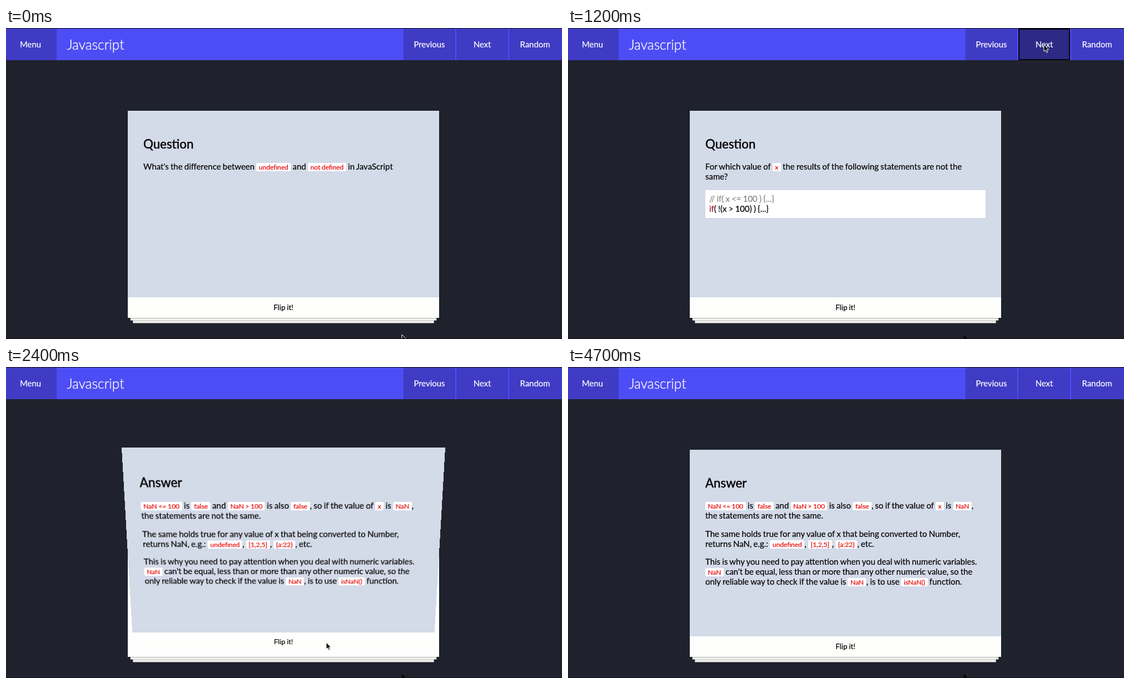
Recreate the animation shown at these times as an HTML page. Size 1000 by 560 pixels, loop 5200 ms.

```html
<!DOCTYPE html>
<html lang="en">
<head>
<meta charset="utf-8">
<title>Flashcards</title>
<style>
  html, body { margin: 0; width: 100%; height: 100%; overflow: hidden; background: #1f222c; }
  body { font: 14.93px/1.2 Lato, "Open Sans", sans-serif; word-spacing: -.55px; color: #000; -webkit-text-stroke: .2px; }
  #stage { position: relative; width: 1000px; height: 560px; overflow: hidden; background: #1f222c; }
  #stage::before, #stage::after { content: ""; position: absolute; left: 0; width: 100%; height: 1px; background: #101218; }
  #stage::before { top: 0; }
  #stage::after { bottom: 0; }

  header { position: absolute; top: 1px; left: 0; width: 1000px; height: 57px; background: #4d4df5; color: #fff; }
  header h1 { position: absolute; left: 109.5px; top: 14px; margin: 0; font-size: 24.5px; font-weight: 300; -webkit-text-stroke: .35px; }
  .btn { position: absolute; top: 0; height: 57px; box-sizing: border-box; line-height: 57px; text-align: center; background: #3f3bc4; }
  .btn.hover { background: #2d2a85; }
  .btn.focus { box-shadow: inset 0 0 0 2px #050510; }
  #menu { left: 0; width: 91px; padding-right: 3px; }
  #prev { left: 715px; width: 93px; }
  #next { left: 810px; width: 93px; }
  #rand { left: 905px; width: 95px; padding-right: 2px; }

  .base, .card { position: absolute; left: 219px; top: 149px; width: 560px; height: 373px; }
  .base {
    background: #fff;
    box-shadow: 0 1px 1px rgba(0,0,0,.25),
      0 9.3px 0 -4.7px #f3f3f0, 0 9.3px 1px -3.9px rgba(0,0,0,.25),
      0 18.7px 0 -9.3px #f3f3f0;
  }
  .card { background: #d3dae8; white-space: nowrap; }
  .card article { padding: 28px; }
  h2 { margin: 18.6px 0; font-size: 22.3px; line-height: 26.9px; font-weight: 400; -webkit-text-stroke: .45px; }
  p { margin: 0 0 14.8px; }
  code { font: 12px/1.2 Lato, "Open Sans", sans-serif; padding: 0 4.5px; border-radius: 2px; background: #fff; color: #e60000; }
  pre { margin: 0; padding: 7px; font: inherit; background: #fff; }
  pre i { font-style: normal; color: #858585; }
  pre b { font-weight: 400; color: #a01020; }
  footer { position: absolute; left: 0; bottom: 0; width: 100%; height: 37px; line-height: 37px; font-size: 13.3px; text-align: center; background: #fefefc; }
  footer.focus { outline: 3px solid rgba(50,85,245,.65); }
  svg { position: absolute; left: 0; top: 0; }
</style>
</head>
<body>
<div id="stage">
  <header>
    <div class="btn" id="menu">Menu</div>
    <h1>Javascript</h1>
    <div class="btn" id="prev">Previous</div>
    <div class="btn" id="next">Next</div>
    <div class="btn" id="rand">Random</div>
  </header>

  <div class="base"></div>

  <section class="card" id="front">
    <article id="first">
      <h2>Question</h2>
      <p>What's the difference between <code>undefined</code> and <code>not defined</code> in JavaScript</p>
    </article>
    <article id="second">
      <h2>Question</h2>
      <p>For which value of <code>x</code> the results of the following statements are not the<br>same?</p>
      <pre><i>// if( x &lt;= 100 ) {...}</i>
<b>if</b>( !(x &gt; 100) ) {...}</pre>
    </article>
    <footer id="flip">Flip it!</footer>
  </section>

  <section class="card" id="back">
    <article>
      <h2>Answer</h2>
      <p><code>NaN &lt;= 100</code> is <code>false</code> and <code>NaN &gt; 100</code> is also <code>false</code>, so if the value of <code>x</code> is <code>NaN</code>,<br>the statements are not the same.</p>
      <p>The same holds true for any value of x that being converted to Number,<br>returns NaN, e.g.: <code>undefined</code>, <code>[1,2,5]</code>, <code>{a:22}</code>, etc.</p>
      <p>This is why you need to pay attention when you deal with numeric variables.<br><code>NaN</code> can't be equal, less than or more than any other numeric value, so the<br>only reliable way to check if the value is <code>NaN</code>, is to use <code>isNaN()</code> function.</p>
    </article>
    <footer>Flip it!</footer>
  </section>

  <svg width="1000" height="560">
    <path id="speck" d="M712 553l7 7h-7z" fill="#000"/>
    <path id="cursor" d="M0 0V12.2L2.8 9.6L4.8 14.2L6.8 13.3L4.9 8.9H8.6Z" fill="#000" stroke="#fff"/>
  </svg>
</div>

<script>
const LOOP = 5200, STEP = 100, SCALE = 14 / 15;
const $ = id => document.getElementById(id);
const clamp = k => Math.min(1, Math.max(0, k));
const smooth = k => k * k * (3 - 2 * k);
const easeOut = k => 1 - (1 - k) ** 1.85;
const mix = (a, b, k) => a + (b - a) * k;
const show = (id, on) => { $(id).style.display = on ? "" : "none"; };

// Pointer stops: time, x, y
const path = [
  [0, 712, 552], [600, 925, 40], [800, 856, 30], [1500, 856, 30], [1800, 576, 496],
  [3000, 576, 496], [3200, 742, 32], [3300, 742, 32], [3400, 671, 53], [3600, 655, 425]
];

function pointer(t) {
  const i = path.findIndex(p => p[0] > t);
  if (i < 0) return path[path.length - 1].slice(1);
  const [t0, x0, y0] = path[i - 1], [t1, x1, y1] = path[i];
  const k = smooth((t - t0) / (t1 - t0));
  return [mix(x0, x1, k), mix(y0, y1, k)];
}

// The card backs up a little, then shoots out to the right
function slide(t) {
  const k = (t - 900) / 500, front = $("front").style;
  front.transform = "none";
  front.opacity = 1;
  if (k <= 0 || t >= 1200) return;
  const out = easeOut(clamp((k - .2) / .8));
  const x = k <= .2 ? -20 * easeOut(k / .2) : mix(-20, 2000, out);
  front.transform = `translateX(${x * SCALE}px)`;
  front.opacity = 1 - out;
}

function flip(t) {
  const angle = 180 * smooth(clamp((t - 2060) / 400));
  const isFront = angle < 90;
  show("front", isFront);
  show("back", !isFront);
  const tilt = isFront ? angle : angle - 180;
  if (angle) $(isFront ? "front" : "back").style.transform =
    tilt ? `perspective(933px) rotateX(${tilt}deg)` : "none";
}

function draw(t) {
  const mark = (id, name, from, to) => $(id).classList.toggle(name, t >= from && t < to);
  mark("rand", "hover", 600, 700);
  mark("next", "hover", 700, 1600);
  mark("next", "focus", 900, 2000);
  mark("prev", "hover", 3200, 3500);
  mark("flip", "focus", 2000, LOOP);

  show("first", t < 1200);
  show("second", t >= 1200);
  slide(t);
  flip(t);

  show("speck", t >= STEP);
  show("cursor", t < 3700);
  $("cursor").setAttribute("transform", `translate(${pointer(t)})`);
}

const start = performance.now();
function tick() {
  const t = (performance.now() - start) % LOOP;
  draw(Math.floor(t / STEP) * STEP);
  requestAnimationFrame(tick);
}
tick();
</script>
</body>
</html>
```
